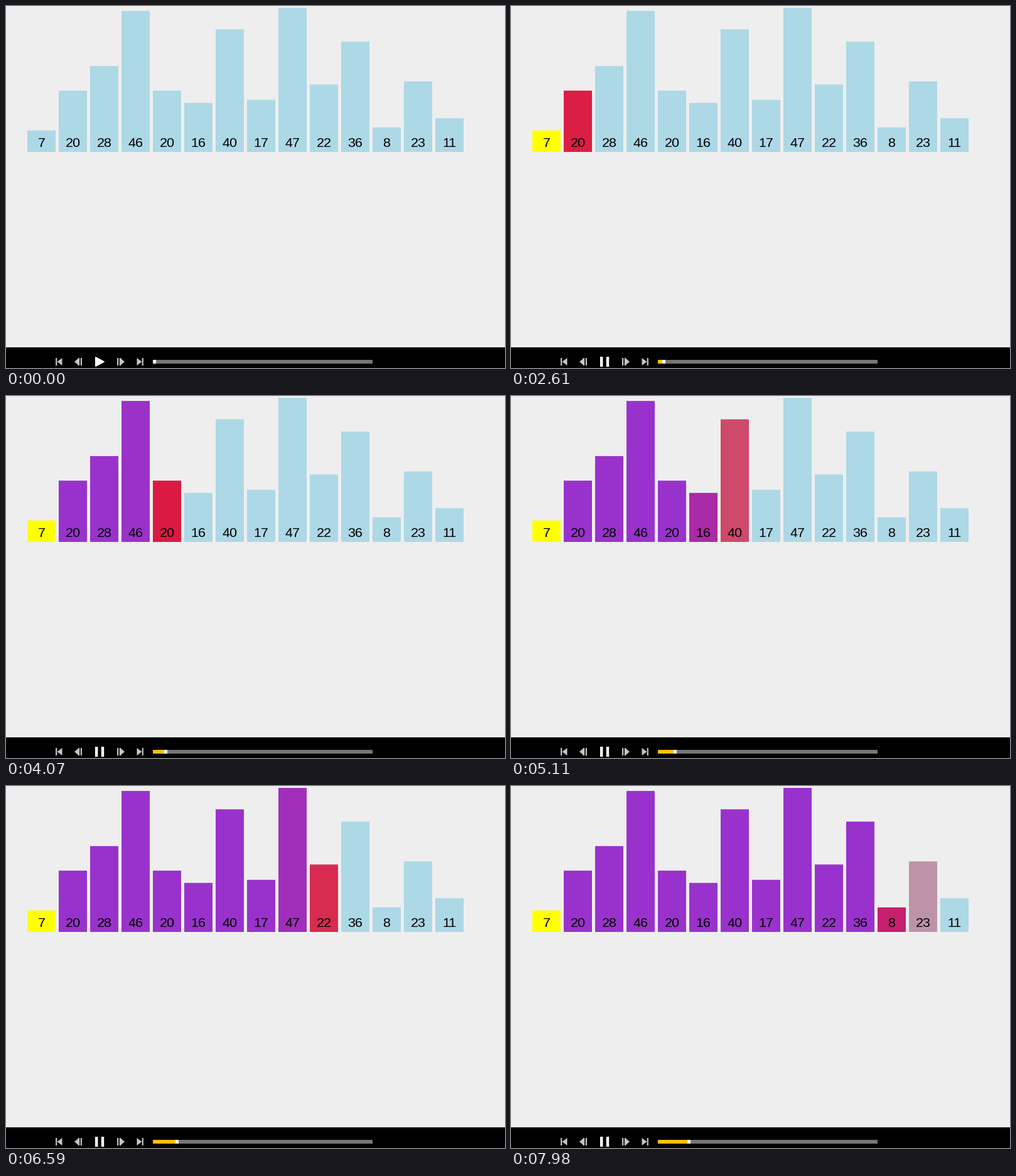
A matplotlib script that plays this animation: 795 px wide and 578 px high, repeating every 8 s.

```python
import numpy as np
import matplotlib.pyplot as plt
from matplotlib.animation import FuncAnimation
from matplotlib.patches import Polygon, Rectangle

W, H, DPI = 795, 578, 100
LOOP, INTERVAL = 8000, 20
FADE_MS, SLIDER_LEAD = 250, 40

VALUES = [7, 20, 28, 46, 20, 16, 40, 17, 47, 22, 36, 8, 23, 11]
UNIT = 230 / max(VALUES)
BLUE, YELLOW, CRIMSON, ORCHID = (np.array(c) / 255 for c in (
    (173, 216, 230), (255, 255, 0), (220, 20, 60), (153, 50, 204)))
ICON = "#c4c4c4"

# The scan visits one bar about every half second, paced by a few key moments.
STARTS = np.interp(np.arange(13), [0, 1, 4, 6, 7, 9, 12],
                   [1500, 2418, 3870, 4962, 5486, 6417, 7879])

fig = plt.figure(figsize=(W / DPI, H / DPI), dpi=DPI, facecolor="#eeeeee")
ax = fig.add_axes([0, 0, 1, 1])
ax.set(xlim=(0, W), ylim=(H, 0))
ax.axis("off")


def rect(x, y, w, h, color, z=1):
    return ax.add_patch(Rectangle((x, y), w, h, fc=color, lw=0, zorder=z,
                                  snap=False))


def poly(points, color, z=2, **style):
    style = {"lw": 0, **style}
    return ax.add_patch(Polygon(points, closed=True, fc=color, zorder=z,
                                snap=False, **style))


def half_icon(side, tip, base, *strips):
    """Arrow and upright strips, given as distances from the play button."""
    def at(distance):
        return 149 + side * distance

    poly([(at(base), 562), (at(tip), 568), (at(base), 574)], ICON)
    for d in strips:
        rect(at(d) - 1.1, 562, 2.2, 12, ICON, 2)


bars = []
for i, value in enumerate(VALUES):
    x, height = 34 + 50 * i, UNIT * value
    bars.append(rect(x, 233 - height, 45, height, BLUE))
    ax.text(x + 22.5, 225, str(value), ha="center", va="baseline", zorder=3,
            fontsize=21.5 * 72 / DPI, family="Liberation Sans", color="black")

# Player controls
rect(0, 545, W, 33, "black")
for side in (-1, 1):
    half_icon(side, 67.5, 59.5, 68.8)
    half_icon(side, 40, 33, 33, 29.1)
play = poly([(142.8, 560.8), (156.2, 568), (142.8, 575.2)], "white",
            ec="white", lw=1.1, joinstyle="round")
pause = [rect(x, 560, 4.4, 16, "white", 2) for x in (142, 151.8)]

rect(234, 565, 350, 6, "#777777", 2)
progress = rect(234, 565, 0, 6, "#ffc107", 3)
thumb = rect(234, 565, 5, 6, "white", 4)

HAND = np.array([(5, 0), (7.5, 0), (7.5, 6), (16.5, 9), (13.5, 21), (6, 21),
                 (0, 12), (5, 13)])
hand = poly(HAND, "white", 6, ec="black", lw=0.7, joinstyle="round")


def ease(u):
    """Cubic ease in and out."""
    u = np.clip(u, 0, 1)
    return 4 * u ** 3 if u < 0.5 else 1 - 4 * (1 - u) ** 3


def mix(a, b, amount):
    return a + (b - a) * amount


def bar_color(i, t):
    if i >= len(STARTS):
        return BLUE
    reached = ease((t - STARTS[i]) / FADE_MS)
    if i == 0:
        return mix(BLUE, YELLOW, reached)
    color = mix(BLUE, CRIMSON, reached)
    if i + 1 < len(STARTS):
        color = mix(color, ORCHID, ease((t - STARTS[i + 1]) / FADE_MS))
    return color


def move_hand(t):
    hand.set_visible(220 <= t < 2140)
    x = np.interp(t, [220, 890], [293, 145])
    y = np.interp(t, [220, 620, 890], [570, 554, 565])
    hand.set_xy(HAND + (x, y))


def update(frame):
    t = (frame + 0.5) * INTERVAL
    for i, bar in enumerate(bars):
        bar.set_facecolor(bar_color(i, t))

    step = np.count_nonzero(t >= STARTS - SLIDER_LEAD)
    done = round(3.62 * step)
    progress.set_width(done)
    thumb.set_x(234 + done)

    running = t >= STARTS[0]
    play.set_visible(not running)
    for part in pause:
        part.set_visible(running)
    move_hand(t)
    return [*bars, progress, thumb, play, *pause, hand]


anim = FuncAnimation(fig, update, frames=LOOP // INTERVAL, interval=INTERVAL,
                     repeat=True, repeat_delay=0, blit=False)
plt.show()
```
